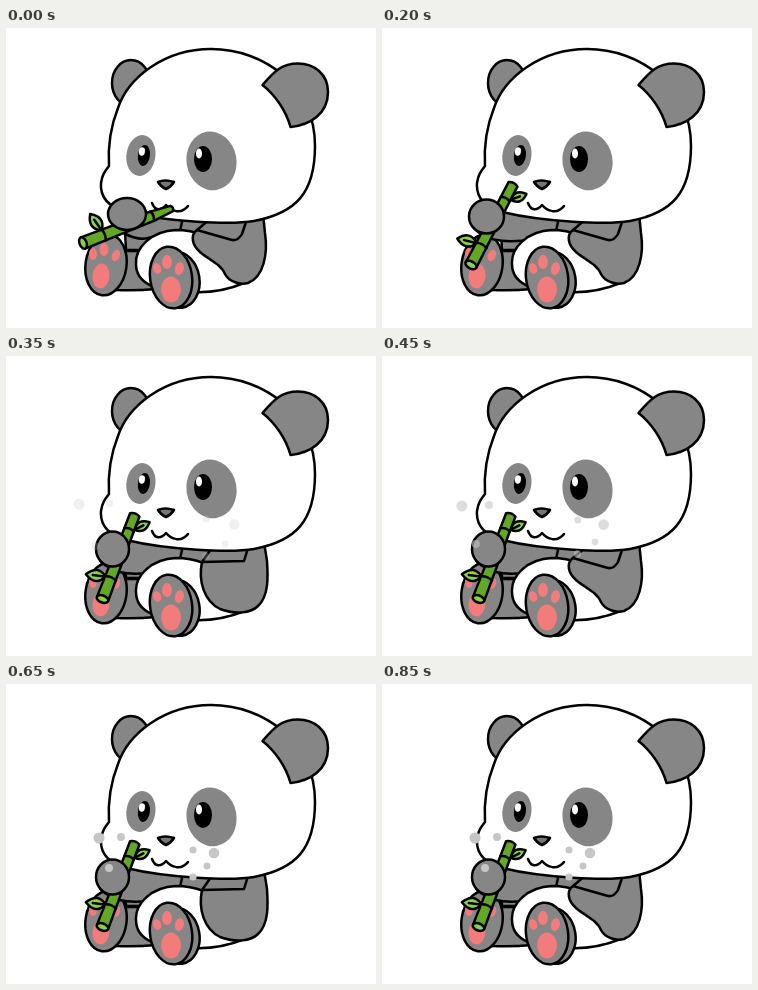
An HTML page for the animation above (900 ms loop, 370 by 300 pixels).

```html
<!DOCTYPE html>
<html lang="en">
<head>
<meta charset="utf-8">
<title>Panda eating bamboo</title>
<style>
html, body { margin: 0; width: 100%; height: 100%; overflow: hidden; background: #fff; }
svg { display: block; width: 370px; height: 300px; }
.line { stroke: #000; stroke-width: 2.5; stroke-linejoin: round; stroke-linecap: round; }
.grey { fill: #868686; }
.white { fill: #fff; }
.pink { fill: #f27b7b; }
.stem { fill: #62a725; }
.leaf { fill: #8ed04b; }
.open { fill: none; }
</style>
</head>
<body>
<svg viewBox="0 0 370 300">
  <g id="body">
    <ellipse class="line grey" cx="125" cy="55" rx="19" ry="23"/>
    <path class="line grey" d="M118 186L250 186 245 222 120 222Z"/>
    <path class="line grey" d="M112 223L150 223 150 261Q130 263 110 262Z"/>
    <ellipse class="line grey" cx="100" cy="237" rx="20.5" ry="30.5" transform="rotate(8 100 237)"/>
    <g class="pink">
      <ellipse cx="95" cy="248" rx="8.5" ry="12.5" transform="rotate(5 95 248)"/>
      <ellipse cx="87" cy="226" rx="4" ry="6"/>
      <ellipse cx="98" cy="221.5" rx="4.5" ry="6.5"/>
      <ellipse cx="110" cy="227.5" rx="4" ry="6" transform="rotate(22 110 227)"/>
    </g>
    <path id="arm" class="line grey"/>
    <path class="line white" d="M130 236C129 220 145 203 170 202C192 202 208 210 222 222L238 255C222 262 205 265 185 264C152 264 130 256 130 236Z"/>
    <ellipse class="line grey" cx="172.500" cy="252" rx="21" ry="28" transform="rotate(-8 172 252)"/>
    <ellipse class="line grey" cx="165" cy="249.500" rx="21" ry="31" transform="rotate(-8 165 249)"/>
    <g class="pink">
      <ellipse cx="165" cy="261.500" rx="10" ry="13"/>
      <ellipse cx="151" cy="240.500" rx="4" ry="5.500" transform="rotate(-18 151 240)"/>
      <ellipse cx="161" cy="234" rx="5" ry="7"/>
      <ellipse cx="173.500" cy="240.500" rx="4.500" ry="6.500" transform="rotate(14 173 240)"/>
    </g>
    <path id="farArm" class="line grey"/>
    <path id="crease" class="line open"/>
  </g>
  <g id="head">
    <path class="line white" d="M205 21C258 21 309 58 309 118C309 165 290 185 248 193C225 197 162 194 120 184C100 178 94 167 95 155C96 147 99 143 103 138C102 122 104 100 112 80C122 50 158 21 205 21Z"/>
    <path class="line grey" d="M256.500 57C268 66 280 82 284.500 99C304 97 322 86 322 64C322 46 308 35.500 292 35.500C275 35.500 268 44 256.500 57Z"/>
    <ellipse class="grey" cx="135" cy="127.500" rx="14.500" ry="20.500" transform="rotate(8 135 127)"/>
    <ellipse cx="138" cy="127.500" rx="6" ry="10.500" transform="rotate(8 138 127)"/>
    <ellipse class="white" cx="136" cy="123.500" rx="3" ry="4.200" transform="rotate(8 136 123)"/>
    <ellipse class="grey" cx="205.500" cy="133" rx="25" ry="29.500" transform="rotate(-10 205 133)"/>
    <ellipse cx="197" cy="131" rx="9" ry="13"/>
    <ellipse class="white" cx="193" cy="125.500" rx="3" ry="5"/>
    <path class="line" fill="#777" d="M152 154Q159 151 168 154Q165 159 160 161Q155 159 152 154Z"/>
    <path class="line open" d="M146 175C149 183 155 183 160 177C165 183 175 187 182 178"/>
  </g>
  <g id="bamboo" class="line">
    <path id="lowLeaf" class="leaf" d="M0 0Q9 -11 20 0Q9 11 0 0ZM0 0H13" transform="translate(22 -5) rotate(-104)"/>
    <path id="tipLeaf" class="leaf" d="M0 0Q8 -9 17 0Q8 9 0 0ZM0 0H10" transform="translate(76 5) rotate(42)"/>
    <path id="stem" class="stem"/>
    <path class="open" d="M22 -6Q25 0 22 6M74 -5Q77 0 74 5"/>
    <ellipse class="leaf" cx="0" cy="0" rx="3.500" ry="6"/>
  </g>
  <ellipse id="hand" class="line grey"/>
  <g id="crumbs" fill="#c6c6c6"></g>
</svg>
<script>
const LOOP = 900, STEP = 50;
const $ = id => document.getElementById(id);
const set = (el, attrs) => { for (const k in attrs) el.setAttribute(k, attrs[k]); };

// step, stem base x y, stem angle, stem length, hand x y, hand radii, tip half width
const POSES = [
  [0, 77, 215, -21.2, 95, 121, 186, 19, 16, 3],
  [3, 66, 205, -14, 101, 113, 183.5, 19.5, 15.5, 1.5],
  [4, 89, 237, -62.5, 91, 104.5, 188.5, 17.5, 17, 5],
  [5, 96.5, 243, -69, 90, 106.5, 193, 16.5, 17.5, 5]
];

// resting x y, drift per step x y, radius
const CRUMBS = [
  [93, 154, 3.3, 1, 5.5], [115, 153, 2, 1, 4], [187, 166, -2.2, .5, 3.5],
  [208, 169, -3.4, .1, 5.3], [201, 182, -3, -1, 3.4], [187, 193, -2.1, -1.2, 3.6],
  [103, 184, 2.3, -1, 4]
].map(data => {
  const el = document.createElementNS("http://www.w3.org/2000/svg", "circle");
  el.setAttribute("r", data[4]);
  $("crumbs").append(el);
  return { el, data };
});

const FAR_ARM = [
  "M191 202C184 207 186 217 194 224C203 232 215 236 219 246C223 254 234 257 242 255C258 249 262 225 259 205L257 186 210 186Z",
  "M196 206C192 225 198 245 214 253C230 259 245 257 252 250C263 240 262 220 261 205L258 186 210 186Z"
];
const CREASE = ["M240 194L236 206Q232 213 226 212L191 202", "M242 192L238 205L196 206"];

function poseAt(n) {
  if (n >= 3) return POSES[Math.min(n - 2, 3)];
  return POSES[0].map((v, i) => v + (POSES[1][i] - v) * n / 3);
}

function draw(n) {
  const [, x, y, turn, len, hx, hy, rx, ry, tip] = poseAt(n);
  set($("bamboo"), { transform: `translate(${x} ${y}) rotate(${turn})` });
  set($("stem"), { d: `M0 -6L74 -5 ${len} ${-tip}Q${len + 3} 0 ${len} ${tip}L74 5 0 6Z` });
  set($("tipLeaf"), { visibility: n ? "visible" : "hidden" });
  set($("hand"), { cx: hx, cy: hy, rx, ry });
  set($("arm"), {
    d: `M${hx - 12} ${hy + 12}C${hx} ${hy + 24} ${hx + 14} ${hy + 26} 142 ${hy + 24}L174 203 179 180 115 180Z`
  });

  const swing = n % 6 === 1 || n % 6 === 2 ? 1 : 0;
  set($("farArm"), { d: FAR_ARM[swing] });
  set($("crease"), { d: CREASE[swing] });

  const left = Math.max(0, 13 - n);
  set($("crumbs"), { opacity: Math.max(0, Math.min(1, (n - 5.5) / 6)) });
  for (const { el, data: [cx, cy, dx, dy] } of CRUMBS)
    set(el, { cx: cx - dx * left, cy: cy - dy * left });
}

const start = performance.now();
let shown = -1;
function tick(now) {
  const n = Math.floor(Math.max(0, now - start) % LOOP / STEP);
  if (n !== shown) draw(shown = n);
  requestAnimationFrame(tick);
}
tick(start);
</script>
</body>
</html>
```
